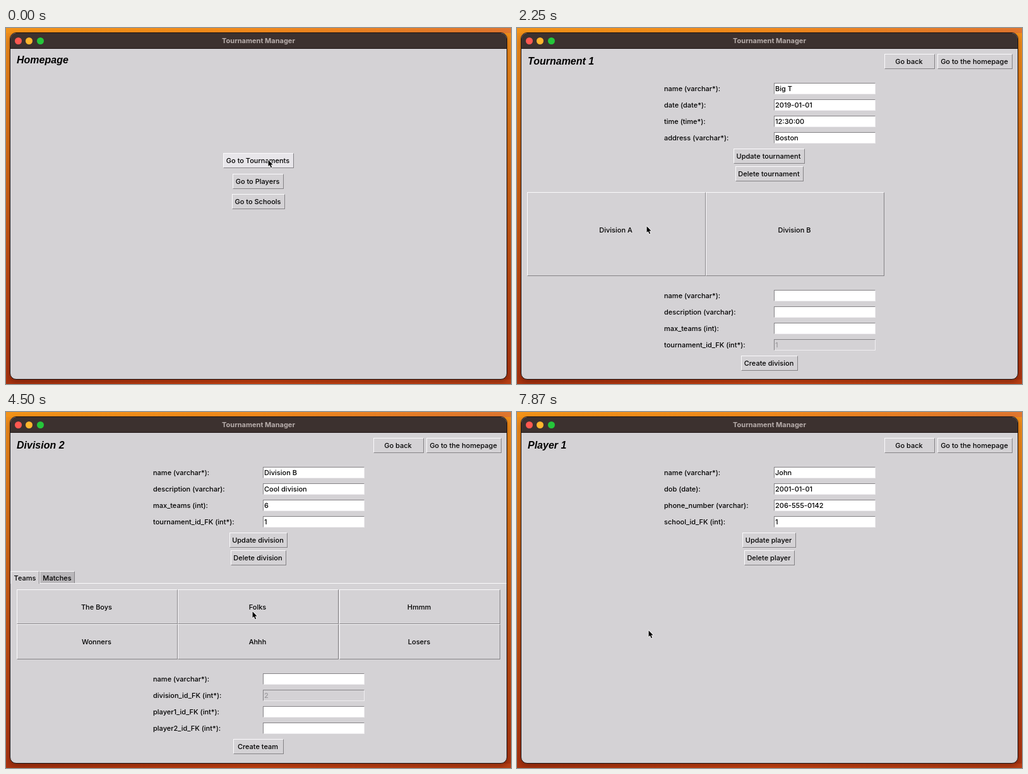
An HTML page that plays this animation: 800 px wide and 564 px high, repeating every 8000 ms.

```html
<!DOCTYPE html>
<html lang="en">
<head>
<meta charset="utf-8">
<title>Tournament Manager</title>
<style>
  html, body { margin: 0; width: 100%; height: 100%; overflow: hidden; }
  body {
    position: relative;
    font: 500 11px/14px Inter, "Open Sans", sans-serif;
    color: #000;
    background:
      linear-gradient(90deg, #f39318, #f28a1c 50%, #e0762f) 0 0 / 100% 8px no-repeat,
      linear-gradient(90deg, #a8330f, #cc4612 50%, #b83f14) 0 100% / 100% 7px no-repeat,
      linear-gradient(#f08f1a, #d66d15 35%, #bd4a11 70%, #a8330f);
  }
  div, h1, svg { position: absolute; box-sizing: border-box; margin: 0; }
  .window {
    left: 6px; top: 7px; width: 788px; height: 550px;
    border: 1px solid #1b1312; border-radius: 10px;
    background: #d4d2d5; overflow: hidden;
    box-shadow: 0 4px 8px rgba(50, 5, 0, .35);
  }
  .bar {
    left: 0; top: 0; width: 100%; height: 25px;
    background: #3c312f; border-bottom: 1px solid #1f1716;
    color: #b7adab; font-weight: 700; line-height: 24px; text-align: center;
  }
  .light { top: 6.5px; width: 11px; height: 11px; border-radius: 50%; }
  .screen { left: 0; top: 0; width: 800px; height: 564px; visibility: hidden; }
  .screen.on { visibility: visible; }
  h1 { left: 17px; font: italic bold 16px/20px "Liberation Sans", Arial, sans-serif; white-space: pre; }
  .label { white-space: pre; }
  .button, .tab {
    display: flex; align-items: center; justify-content: center;
    padding-right: 2px; white-space: pre;
    border: 1px solid; border-color: #fbfafc #858386 #858386 #fbfafc;
  }
  .hover { background: #e8e6ea; }
  .pressed {
    padding: 1px 0 0; border-color: #858386 #fbfafc #fbfafc #858386;
    outline: 1px dotted #111; outline-offset: -1px;
  }
  .entry {
    padding-left: 1px; line-height: 17px; white-space: pre; background: #fff;
    border: 1px solid; border-color: #858386 #f0eef1 #f0eef1 #858386;
  }
  .entry.off { background: #d4d2d5; color: #9c9a9d; }
  .tab { padding-right: 0; border-bottom: 0; }
  .tab.back { background: #b9b7ba; }
  .line { background: #fbfafc; }
</style>
</head>
<body>
<div class="window">
  <div class="bar">Tournament Manager</div>
  <div class="light" style="left:6.5px;background:#ff5850"></div>
  <div class="light" style="left:24px;background:#ffb52d"></div>
  <div class="light" style="left:41.5px;background:#25c63a"></div>
</div>
<script>
const LOOP = 8000, STEP = 125;

function add(parent, cls, x, y, w, h, text = "") {
  const el = document.createElement("div");
  el.className = cls;
  el.textContent = text;
  el.style.cssText = `left:${x}px;top:${y}px;` + (w ? `width:${w}px;height:${h}px` : "");
  parent.append(el);
  return el;
}

function screen(title, titleTop = 43) {
  const el = add(document.body, "screen", 0, 0);
  const head = document.createElement("h1");
  head.textContent = title;
  head.style.top = titleTop + "px";
  el.append(head);
  return el;
}

function page(title) {
  const el = screen(title);
  button(el, 582, 41, 80, "Go back");
  button(el, 666, 41, 119, "Go to the homepage");
  return el;
}

function button(parent, x, y, w, text, h = 24) {
  return add(parent, "button", x, y, w, h, text);
}

// Each row is [label, value, disabled]; rows are 26px apart.
function form(parent, y, rows) {
  rows.forEach(([label, value = "", off], i) => {
    const top = Math.round(y + i * 26.1);
    add(parent, "label", 233, top + 3, 0, 0, label);
    add(parent, off ? "entry off" : "entry", 407, top + 0.5, 161, 18.5, value);
  });
}

const home = screen("Homepage", 41);
const toTournaments = button(home, 344, 198, 112, "Go to Tournaments");
button(home, 359, 231, 81, "Go to Players");
button(home, 358, 263, 84, "Go to Schools");

const list = page("Tournaments");
form(list, 86, [["name (varchar*):"], ["date (date*):"], ["time (time*):"], ["address (varchar*):"]]);
button(list, 345, 191, 110, "Create tournament");
const [bigT, bigL] = ["Big T\n2019-01-01\nBoston", "Big L\n2019-04-01\nDallas", "Big X\n2018-02-01\nMarlough"]
  .map((text, i) => button(list, 16 + i * 256, 237, 256, text, 311));

const tournament = page("Tournament 1");
form(tournament, 86, [["name (varchar*):", "Big T"], ["date (date*):", "2019-01-01"],
  ["time (time*):", "12:30:00"], ["address (varchar*):", "Boston"]]);
button(tournament, 343, 191, 113, "Update tournament");
button(tournament, 346, 219, 108, "Delete tournament");
const [divA, divB] = ["Division A\n ", "Division B\n "]
  .map((text, i) => button(tournament, 16 + i * 283, 260, 283, text, 133));
form(tournament, 414, [["name (varchar*):"], ["description (varchar):"], ["max_teams (int):"],
  ["tournament_id_FK (int*):", "1", true]]);
button(tournament, 355, 519, 90, "Create division");

const division = page("Division 2");
form(division, 86, [["name (varchar*):", "Division B"], ["description (varchar):", "Cool division"],
  ["max_teams (int):", "6"], ["tournament_id_FK (int*):", "1"]]);
button(division, 354, 191, 92, "Update division");
button(division, 356, 219, 88, "Delete division");
add(division, "tab", 7, 252, 46, 20, "Teams");
add(division, "tab back", 53, 252, 56, 20, "Matches");
add(division, "line", 53, 271, 740, 1);
const [boys, folks] = ["The Boys", "Folks", "Hmmm", "Wonners", "Ahhh", "Losers"]
  .map((text, i) => button(division, Math.round(16.6 + i % 3 * 255.6), i < 3 ? 281 : 336, 255, text, i < 3 ? 55 : 56));
form(division, 413, [["name (varchar*):"], ["division_id_FK (int*):", "2", true],
  ["player1_id_FK (int*):"], ["player2_id_FK (int*):"]]);
button(division, 360, 518, 80, "Create team");

const team = page("Team 1");
form(team, 86, [["name (varchar*):", "The Boys"], ["division_id_FK (int*):", "2"],
  ["player1_id_FK (int*):", "1"], ["player2_id_FK (int*):", "2"]]);
button(team, 360, 191, 80, "Update team");
button(team, 360, 219, 80, "Delete team");
const [john] = ["John\n ", "Bob\n "].map((text, i) => button(team, 16 + i * 283, 261, 283, text, 286));

const player = page("Player 1");
form(player, 86, [["name (varchar*):", "John"], ["dob (date):", "2001-01-01"],
  ["phone_number (varchar):", "206-555-0142"], ["school_id_FK (int):", "1"]]);
button(player, 357, 191, 85, "Update player");
button(player, 360, 219, 80, "Delete player");

document.body.insertAdjacentHTML("beforeend", `
  <svg id="cursor" width="14" height="20" viewBox="-2 -2 14 20" style="left:-2px;top:-2px">
    <path d="M.6 1.2V11L2.8 9L4.7 13.2L6.2 12.5L4.4 8.4H7.6Z" fill="#000"
      stroke="#f4f3f5" stroke-width="1.8" stroke-linejoin="round" paint-order="stroke"/>
  </svg>`);
const cursor = document.getElementById("cursor");

// [time, screen, button under the pointer, pressed]
const states = [
  [0, home, toTournaments], [750, home, toTournaments, true],
  [1000, list], [1375, list, bigL], [1625, list, bigT], [1875, list, bigT, true],
  [2125, tournament], [2875, tournament, divA], [3125, tournament, divB], [3500, tournament, divB, true],
  [3875, division], [4875, division, folks], [5250, division, boys], [5875, division, boys, true],
  [6375, team], [6500, team, john], [6875, team, john, true],
  [7875, player]
];

// [time, x, y] of the pointer tip
const path = [
  [0, 415, 208], [1125, 415, 208], [1375, 306, 243], [1875, 205, 312], [2750, 205, 314],
  [3000, 300, 320], [3375, 390, 315], [4750, 390, 315], [5500, 202, 314],
  [6375, 202, 314], [6875, 208, 345], [LOOP, 208, 345]
];

function pointerAt(t) {
  const i = path.findIndex(p => p[0] > t);
  const [t0, x0, y0] = path[i - 1], [t1, x1, y1] = path[i];
  const k = (t - t0) / (t1 - t0);
  return [x0 + (x1 - x0) * k, y0 + (y1 - y0) * k];
}

let shown;
function show(state) {
  if (state === shown) return;
  if (shown) {
    shown[1].classList.remove("on");
    shown[2]?.classList.remove("hover", "pressed");
  }
  const [, view, target, pressed] = shown = state;
  view.classList.add("on");
  target?.classList.add("hover");
  target?.classList.toggle("pressed", !!pressed);
}

const start = performance.now();
function draw(now) {
  const time = Math.max(0, now - start) % LOOP;
  const t = Math.min(LOOP - STEP, Math.floor((time + 5) / STEP) * STEP);
  show(states.findLast(s => s[0] <= t));
  const [x, y] = pointerAt(t);
  cursor.style.transform = `translate(${Math.round(x)}px, ${Math.round(y)}px)`;
  requestAnimationFrame(draw);
}
draw(start);
</script>
</body>
</html>
```
